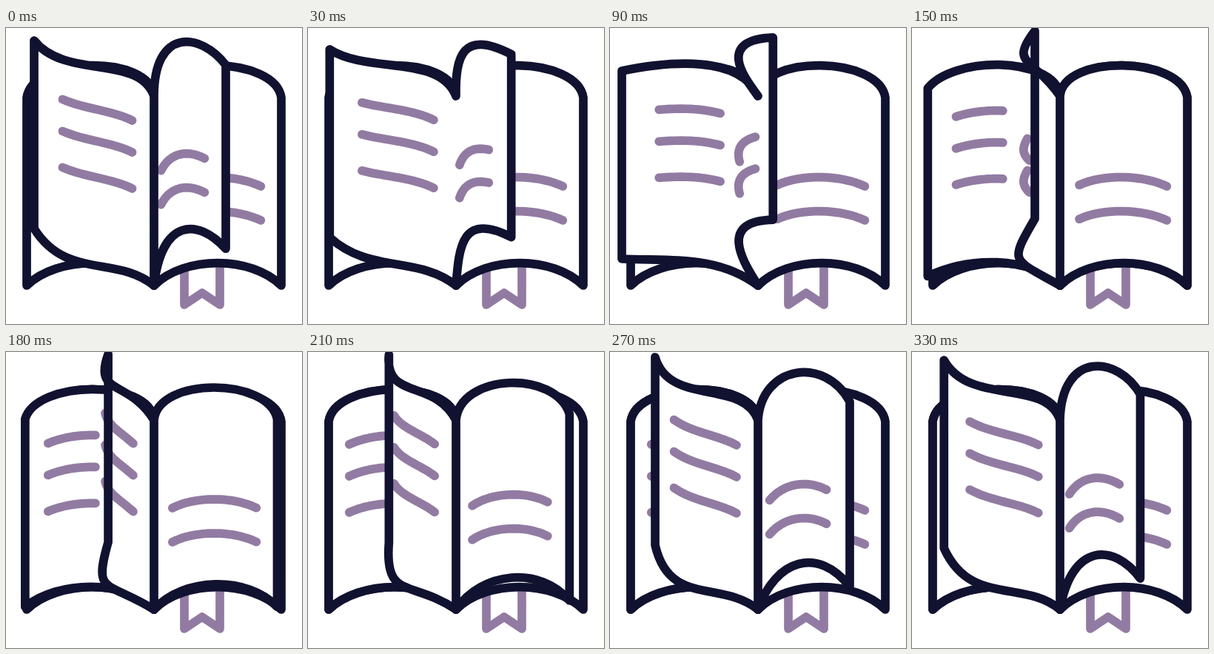
Write an HTML page with a canvas that moves like this. It is 400 px wide and 400 px high and loops after 0.36 s.

```html
<!DOCTYPE html>
<html lang="en">
<head>
<meta charset="utf-8">
<title>Turning pages</title>
<style>
  html, body { margin: 0; width: 100%; height: 100%; overflow: hidden; background: #fff; }
  canvas { display: block; width: 100vmin; height: 100vmin; }
</style>
</head>
<body>
<canvas id="stage" width="400" height="400"></canvas>
<script>
const ctx = document.getElementById('stage').getContext('2d');
const INK = '#111130', PURPLE = '#927ba2';
const LOOP = 360, STEP = 30;
const SPINE = 200, SPINE_TOP = 92, SPINE_BOTTOM = 348, FLAT_TOP = 94;

// Key poses of the sheet's top curve while it turns from right to left:
// free corner, then the two bend points from spine to corner.
const poses = [
  { age: 150, curve: [372, 94, 205, 35, 364, 38] },
  { age: 270, curve: [324, 67, 205, 18, 290, 5] },
  { age: 360, curve: [297, 50, 200, 0, 262, 5] },
  { age: 420, curve: [247, 21, 195, 75, 156, 2] },
  { age: 510, curve: [166, 4, 165, 40, 130, 50] },
  { age: 630, curve: [61, 7, 180, 36, 80, 74] },
  { age: 720, curve: [38, 17, 180, 35, 80, 70] },
  { age: 810, curve: [16, 58, 176, 36, 80, 45] },
  { age: 930, curve: [28, 94, 195, 35, 36, 38] }
];

const lerp = (a, b, k) => a + (b - a) * k;
const ease = k => {
  k = Math.min(1, Math.max(0, k));
  return k * k * (3 - 2 * k);
};

// Rate of change of value i at pose n, zero at both ends
function slope(n, i) {
  const a = poses[n - 1], b = poses[n + 1];
  return a && b ? (b.curve[i] - a.curve[i]) / (b.age - a.age) : 0;
}

// Smooth spline through the poses
function poseAt(age) {
  const last = poses.length - 1;
  age = Math.min(poses[last].age, Math.max(poses[0].age, age));
  const n = Math.max(1, poses.findIndex(p => p.age >= age));
  const a = poses[n - 1], b = poses[n];
  const span = b.age - a.age, k = (age - a.age) / span, r = 1 - k;
  return a.curve.map((v, i) =>
    lerp(v, b.curve[i], ease(k)) +
    span * k * r * (r * slope(n - 1, i) - k * slope(n, i)));
}

const cubic = (a, b, c, d, u) => {
  const r = 1 - u;
  return r * r * r * a + 3 * r * r * u * b + 3 * r * u * u * c + u * u * u * d;
};

function stroke(color, path) {
  ctx.strokeStyle = color;
  ctx.stroke(path);
}

// Text lines follow a stretch of the top curve, moved down the sheet.
function drawText(age, [x, top, ax, ay, bx, by]) {
  const front = age < 540;
  const fold = ease((age - 360) / 60);
  const settle = ease((age - 750) / 120);
  const lift = front ? 0 : 12 * (1 - top / FLAT_TOP) ** 2;
  const [from, to] = front
    ? [lerp(0.24, 0.46, fold), lerp(0.76, 0.88, fold)]
    : [lerp(0.26, 0.48, settle), 0.76];
  const rows = front
    ? [lerp(151, 131, fold), lerp(197, 174, fold)]
    : [62, 105, 154];
  for (const row of rows) {
    const line = new Path2D();
    for (let k = 0; k <= 1; k += 1 / 16) {
      const u = lerp(from, to, k);
      line.lineTo(cubic(SPINE, ax, bx, x, u),
                  cubic(SPINE_TOP, ay, by, top, u) + row - lift * k);
    }
    stroke(PURPLE, line);
  }
}

function drawSheet(age, showSpine) {
  const pose = poseAt(age);
  const [x, top, ax, ay, bx, by] = pose;
  const flat = (top / FLAT_TOP) ** 2;
  const turned = ease((220 - x) / 60);
  const sag = Math.max(flat, turned);

  // The bottom curve repeats the top one, a little shallower.
  const outline = new Path2D();
  outline.moveTo(SPINE, SPINE_TOP);
  outline.bezierCurveTo(ax, ay, bx, by, x, top);
  outline.lineTo(x, top + 246 + 8 * sag);
  outline.bezierCurveTo(
    lerp(bx, SPINE, 0.2 * flat), by + 244 + 26 * sag,
    ax + lerp(37 * flat, -30, turned), ay + 252 + 20 * sag,
    SPINE, SPINE_BOTTOM);
  if (showSpine) outline.closePath();

  ctx.fillStyle = '#fff';
  ctx.fill(outline);
  drawText(age, pose);
  stroke(INK, outline);
}

function draw(t) {
  ctx.fillStyle = '#fff';
  ctx.fillRect(0, 0, 400, 400);
  ctx.lineWidth = 11.7;
  ctx.lineCap = ctx.lineJoin = 'round';
  stroke(PURPLE, new Path2D('M241 320V374L265 358L289 374V320'));

  drawSheet(0, false);
  drawSheet(3 * LOOP, false);
  drawSheet(2 * LOOP + t, false);
  drawSheet(LOOP + t, t === 0);
  if (t >= 150) drawSheet(t, true);
}

function tick() {
  draw(Math.floor(performance.now() / STEP) * STEP % LOOP);
  requestAnimationFrame(tick);
}
tick();
</script>
</body>
</html>
```
